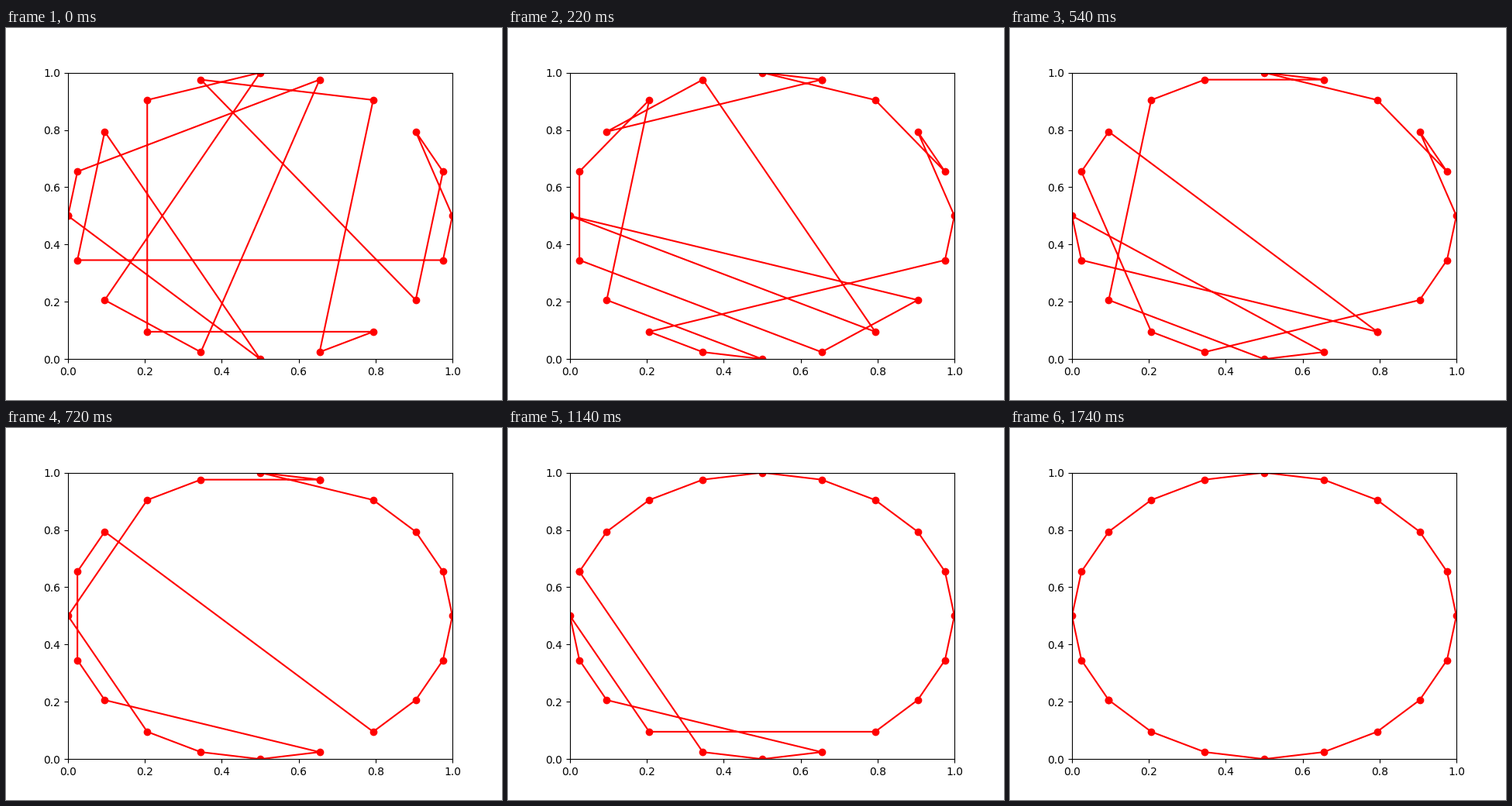
Recreate the animation shown at these times as a matplotlib script. Size 640 px wide and 480 px high, loop 2.4 s.

```python
import numpy as np
import matplotlib.pyplot as plt
from matplotlib.animation import FuncAnimation

STEP_MS = 20
LOOP_MS = 2400
N = 20

# Cities sit on a circle, numbered anticlockwise from the right.
angles = 2 * np.pi * np.arange(N) / N
cities = 0.5 + 0.5 * np.column_stack([np.cos(angles), np.sin(angles)])


def route(*legs):
    """Tour made of single cities and of (first, last) runs along the circle."""
    tour = []
    for leg in legs:
        a, b = leg if isinstance(leg, tuple) else (leg, leg)
        step = 1 if b >= a else -1
        tour += [c % N for c in range(a, b + step, step)]
    return tour


def begin_at(tour, city):
    k = tour.index(city)
    return tour[k:] + tour[:k]


def length(tour):
    points = cities[tour + tour[:1]]
    return np.hypot(*np.diff(points, axis=0).T).sum()


def sort_by_reversals(tour, goal):
    """Put the cities in the goal's order, turning round one stretch at a time."""
    states = []
    for i, city in enumerate(goal):
        j = tour.index(city)
        if i != j:
            tour = tour[:i] + tour[i:j + 1][::-1] + tour[j + 1:]
            states.append(tour)
    return states


def untangle(tour, goal):
    """Fewest reversals to the goal, preferring short tours on the way."""
    options = [sort_by_reversals(begin_at(a, city), begin_at(b, city))
               for city in range(N)
               for a in (tour, tour[::-1])
               for b in (goal, goal[::-1])]
    best = min(options, key=lambda s: (len(s), sum(map(length, s))))
    return [tour] + best[:-1] + [goal]


START = route((10, 9), 4, 14, 12, 5, 7, 13, (17, 16), 3, 6, 18,
              1, 2, (0, -1), 11, 8, 15)

# Each stage: first change, last change (ms), number of changes, tour reached.
STAGES = [
    (40, 220, 5, route((4, 5), 3, 1, 2, (0, -1), (13, 15), 12, 7, 9, 11,
                       16, 18, 10, 17, 6, 8)),
    (300, 460, 4, route((4, 5), 3, 1, 2, (0, -2), (14, 13), 9, 7, 12,
                        (15, 16), (10, 11), 17, 6, 8)),
    (480, 720, 7, route((4, 5), (3, -3), (8, 9), (11, 12), (16, 13), 10,
                        (7, 6))),
    (820, 1140, 4, route((9, -3), 13, (10, 12), (16, 14))),
    (1180, 1320, 3, route((12, 16), (10, -3), 11)),
    (1600, 1740, 3, route((12, -7))),
]


def build_timeline():
    timeline = [(0, START)]
    tour = START
    for first, last, count, goal in STAGES:
        states = untangle(tour, goal)
        for k, ms in enumerate(np.linspace(first, last, count), start=1):
            timeline.append((ms, states[round((len(states) - 1) * k / count)]))
        tour = goal
    return timeline


TIMELINE = build_timeline()

fig, ax = plt.subplots(figsize=(6.4, 4.8), dpi=100)
ax.set_xlim(0, 1)
ax.set_ylim(0, 1)
line, = ax.plot([], [], "ro-")


def update(frame):
    now = frame * STEP_MS
    tour = [t for ms, t in TIMELINE if ms <= now][-1]
    line.set_data(*cities[tour + tour[:1]].T)
    return line,


anim = FuncAnimation(fig, update, frames=LOOP_MS // STEP_MS,
                     interval=STEP_MS, repeat=True, repeat_delay=0)
plt.show()
```
